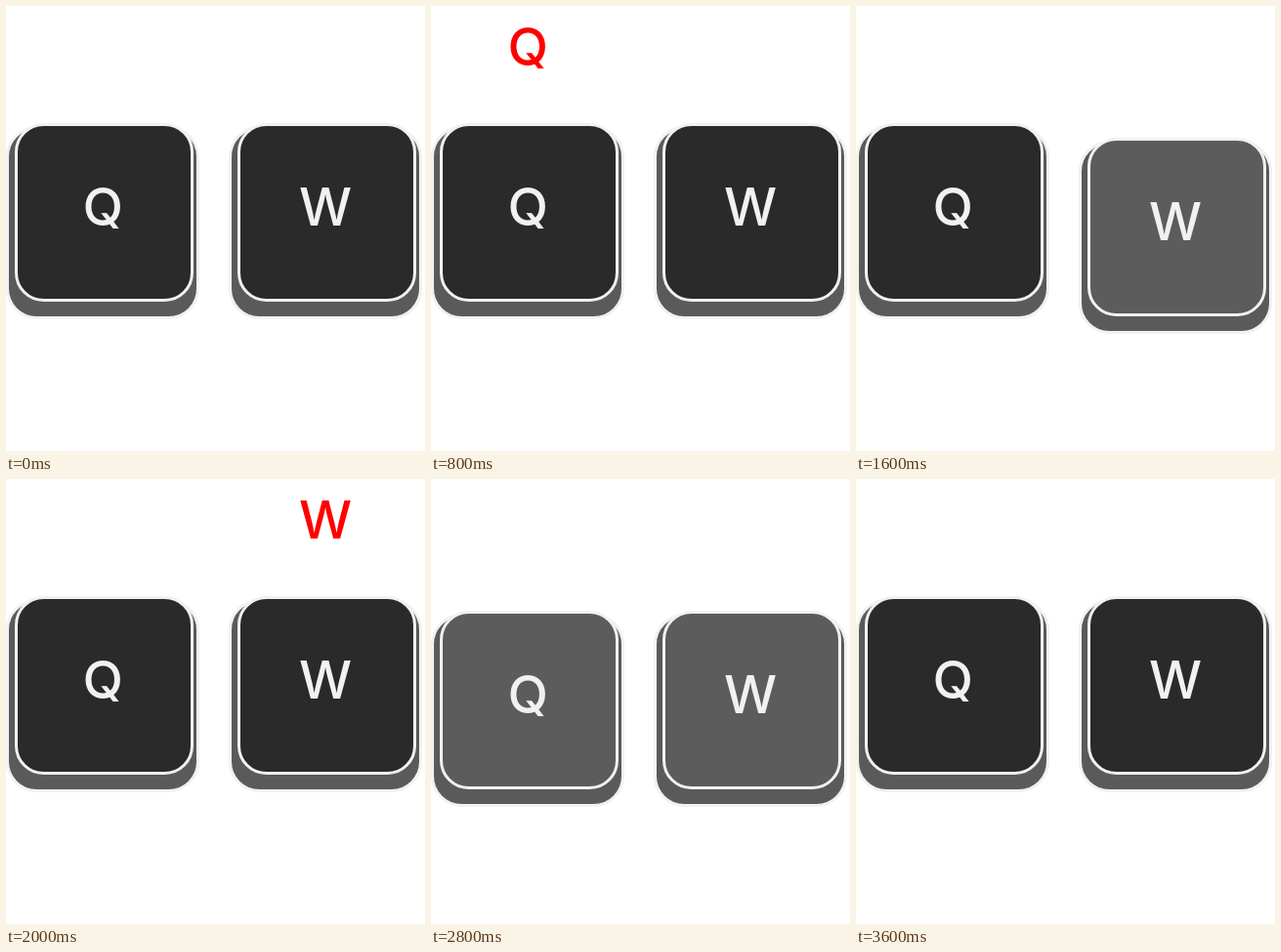
Write an HTML page that moves like this. It is 429 by 456 pixels and loops after 4 s.

```html
<!DOCTYPE html>
<html lang="en">
<head>
<meta charset="utf-8">
<title>Key combo</title>
<style>
  html, body { margin: 0; width: 100%; height: 100%; overflow: hidden; background: #fff; }
  svg { display: block; width: 429px; height: 456px; }
  rect { stroke: #f1f1f1; stroke-width: 3; }
  text { font: 500 54px Inter, "Liberation Sans", sans-serif; text-anchor: middle; fill: #f1f1f1; }
  .base { fill: #5a5a5a; }
  .face { fill: #2a2a2a; }
  .down .face { fill: #5c5c5c; }
  .output { fill: #f00; visibility: hidden; }
  .output.on { visibility: visible; }
  #esc { letter-spacing: 1px; }
</style>
</head>
<body>
<svg viewBox="0 0 429 456">
  <g id="keyQ">
    <rect class="base" x="1.5" y="124.5" width="195" height="195" rx="30"/>
    <rect class="face" x="10.5" y="121.5" width="180" height="180" rx="28"/>
    <text x="99.3" y="225">Q</text>
  </g>
  <g id="keyW">
    <rect class="base" x="229.5" y="124.5" width="195" height="195" rx="30"/>
    <rect class="face" x="238.5" y="121.5" width="180" height="180" rx="28"/>
    <text x="327" y="225">W</text>
  </g>
  <text class="output" id="q" x="99.3" y="60.5">Q</text>
  <text class="output" id="w" x="327" y="60.5">W</text>
  <text class="output" id="esc" x="214" y="423">ESC</text>
</svg>
<script>
  const STEP = 400;
  const TRAVEL = 15;
  // Pressed keys and typed output for each step
  const steps = [
    {}, { down: "Q" }, { out: "q" }, {},
    { down: "W" }, { out: "w" }, {},
    { down: "QW" }, { out: "esc" }, {}
  ];
  const keys = ["Q", "W"].map(name => ({ name, el: document.getElementById("key" + name) }));
  const outputs = document.querySelectorAll(".output");

  function draw(time) {
    const { down = "", out } = steps[Math.floor(time / STEP) % steps.length];
    for (const { name, el } of keys) {
      const pressed = down.includes(name);
      el.classList.toggle("down", pressed);
      el.setAttribute("transform", `translate(0 ${pressed ? TRAVEL : 0})`);
    }
    for (const el of outputs) el.classList.toggle("on", el.id === out);
  }

  const start = performance.now();
  function tick() {
    draw(performance.now() - start);
    requestAnimationFrame(tick);
  }
  tick();
</script>
</body>
</html>
```
